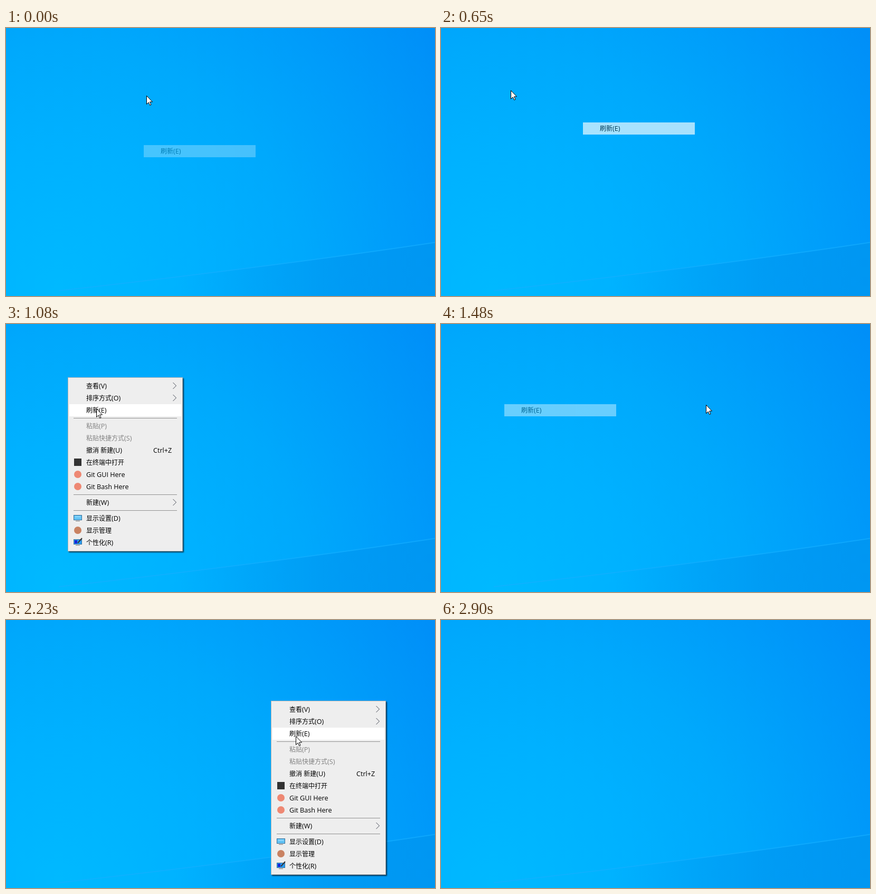
These frames come from a looping animation (813x508 px, 3.31 s). An HTML page:

```html
<!DOCTYPE html>
<html lang="zh-CN">
<head>
<meta charset="utf-8">
<title>刷新</title>
<style>
html, body { margin: 0; width: 100%; height: 100%; overflow: hidden; background: #00a9fc; }
svg { display: block; width: 813px; height: 508px; }
text { font: 12px "Open Sans", "Noto Sans CJK SC", "Noto Sans CJK", sans-serif; white-space: pre; }
.latin { font-size: 12.6px; }
.panel { fill: #eee; stroke: #b4b4b4; filter: drop-shadow(2.5px 2.5px 1px rgba(0, 0, 0, .65)); }
.chevron { fill: none; stroke: #454a55; }
</style>
</head>
<body>
<svg viewBox="0 0 813 508">
  <defs>
    <radialGradient id="sky" gradientUnits="userSpaceOnUse" cx="100" cy="500" r="860">
      <stop offset="0" stop-color="#00b9ff"/>
      <stop offset=".31" stop-color="#00b1ff"/>
      <stop offset=".54" stop-color="#00a9fc"/>
      <stop offset="1" stop-color="#008ff8"/>
    </radialGradient>
    <linearGradient id="shade">
      <stop offset=".4" stop-color="#0096f0" stop-opacity="0"/>
      <stop offset=".75" stop-color="#0096f0" stop-opacity=".6"/>
      <stop offset="1" stop-color="#0096f0" stop-opacity=".8"/>
    </linearGradient>
  </defs>
  <rect width="813" height="508" fill="url(#sky)"/>
  <path d="M0 508Q500 455 813 407V508Z" fill="url(#shade)"/>
  <path d="M100 498Q500 453 813 406.5" fill="none" stroke="#18b0ff" stroke-width="2" opacity=".6"/>
  <g id="faded"><rect width="212" height="23" fill="#fff"/></g>
  <g id="menu">
    <rect class="panel" x=".5" y=".5" width="217" height="329"/>
    <rect id="hover" x="3" width="212" height="23" fill="#fff"/>
  </g>
  <path id="cursor" d="M.5 .5V16.5L4.2 13L6.7 18.5L9 17.5L6.6 12H11.5Z" fill="#fff" stroke="#000"/>
</svg>
<script>
const $ = id => document.getElementById(id);
const ROW = 23, GAP = 7, LOOP = 3310;

function add(parent, tag, attrs, content = '') {
  const node = document.createElementNS('http://www.w3.org/2000/svg', tag);
  for (const key in attrs) node.setAttribute(key, attrs[key]);
  node.innerHTML = content;
  return parent.appendChild(node);
}

function label(parent, x, y, words, fill = '#000') {
  const node = add(parent, 'text', { x, y, fill });
  for (const run of words.match(/[ -~]+|[^ -~]+/g))
    add(node, 'tspan', run < '~' ? { class: 'latin' } : {}, run);
}

// Icons are centred on their own origin
const dot = color => `<circle r="7" fill="${color}"/>`;
const monitor = color => `<rect x="-7.5" y="-5.5" width="15" height="9" fill="${color}" stroke="#3a6f98"/>
  <path d="M-4 5.5H4" stroke="#777"/>`;
const icons = {
  terminal: '<rect x="-7" y="-7" width="14" height="14" fill="#333"/>',
  git: dot('#ee8873'),
  colors: dot('#c98262'),
  display: monitor('#62c3f5') + '<path d="M-5 -2.5H5" stroke="#b4e6ff"/>',
  theme: monitor('#2a9df4') + `<path d="M-6 -4H-1V2H-6Z" fill="#1822d8"/>
    <path d="M0 1L8 -8" stroke="#333" stroke-width="2"/>`
};

const items = [
  { text: '查看(V)', more: true }, { text: '排序方式(O)', more: true }, { text: '刷新(E)' }, null,
  { text: '粘贴(P)', fill: '#838383' }, { text: '粘贴快捷方式(S)', fill: '#838383' },
  { text: '撤消 新建(U)', keys: 'Ctrl+Z' }, { text: '在终端中打开', icon: 'terminal' },
  { text: 'Git GUI Here', icon: 'git' }, { text: 'Git Bash Here', icon: 'git' }, null,
  { text: '新建(W)', more: true }, null,
  { text: '显示设置(D)', icon: 'display' }, { text: '显示管理', icon: 'colors' },
  { text: '个性化(R)', icon: 'theme' }
];

// Lay the rows out from top to bottom; null is a separator
const tops = [];
let top_ = 5;
for (const item of items) {
  if (!item) {
    add($('menu'), 'path', { d: `M11 ${top_ + 3.5}H207`, stroke: '#919191' });
    top_ += GAP;
    continue;
  }
  label($('menu'), 35, top_ + 16, item.text, item.fill);
  if (item.keys) label($('menu'), 162, top_ + 16, item.keys);
  if (item.more) add($('menu'), 'path', { class: 'chevron', d: `M199.5 ${top_ + 5}l6 6l-6 6` });
  if (item.icon) add($('menu'), 'g', { transform: `translate(19 ${top_ + 11})` }, icons[item.icon]);
  tops.push(top_);
  top_ += ROW;
}
label($('faded'), 32, 16, '刷新(E)');

// The picture holds still between these times
const ticks = [0, 120, 240, 650, 810, 930, 1080, 1480, 1620, 1740, 1860, 2110, 2230, 2380, 2500, 2650, 2770, 2900];

// Each menu is open from open to close, then its chosen row fades from fade on
const menus = [
  { x: 258, y: 171, open: -400, close: 0, fade: -170 },
  { x: 266, y: 128, open: 120, close: 650, fade: 650 },
  { x: 117, y: 101, open: 930, close: 1480, fade: 1370 },
  { x: 502, y: 153, open: 1620, close: 2380, fade: 2370 }
];

// Pointer path: time, x, y
const path = [
  [0, 266, 128], [240, 309, 185], [650, 132, 118], [810, 117, 101], [1080, 171, 160],
  [1480, 502, 153], [1860, 539, 230], [2230, 549, 220], [2380, 549, 220],
  [2500, 756, 420], [2650, 769, 489], [2770, 770, 510], [LOOP, 770, 510]
];

function pointerAt(t) {
  const i = path.findIndex(key => key[0] > t);
  const [t0, x0, y0] = path[i - 1], [t1, x1, y1] = path[i];
  const p = (t - t0) / (t1 - t0), ease = p * (2 - p);
  return { x: x0 + (x1 - x0) * ease, y: y0 + (y1 - y0) * ease };
}

function place(id, shown, x, y, opacity = 1) {
  $(id).style.display = shown ? '' : 'none';
  $(id).setAttribute('transform', `translate(${Math.round(x)} ${Math.round(y)})`);
  $(id).setAttribute('opacity', opacity);
}

function draw(time) {
  const t = ticks.filter(tick => tick <= time).pop();
  const pointer = pointerAt(t);
  const open = menus.find(m => t >= m.open && t < m.close);
  const { x, y, close, fade } = menus.filter(m => t >= m.close).pop();
  const alpha = .66 * (1 - (t - fade) / 290);

  place('cursor', true, pointer.x, pointer.y);
  place('faded', !open && alpha > 0, x + 3, y + tops[2], alpha);
  place('menu', open, open ? open.x : 0, open ? open.y : 0);
  if (!open) return;
  const row = tops.find(top => pointer.y - open.y >= top && pointer.y - open.y < top + ROW);
  $('hover').style.display = row ? '' : 'none';
  $('hover').setAttribute('y', row || 0);
}

const start = performance.now();
function tick() {
  draw((performance.now() - start) % LOOP);
  requestAnimationFrame(tick);
}
tick();
</script>
</body>
</html>
```
